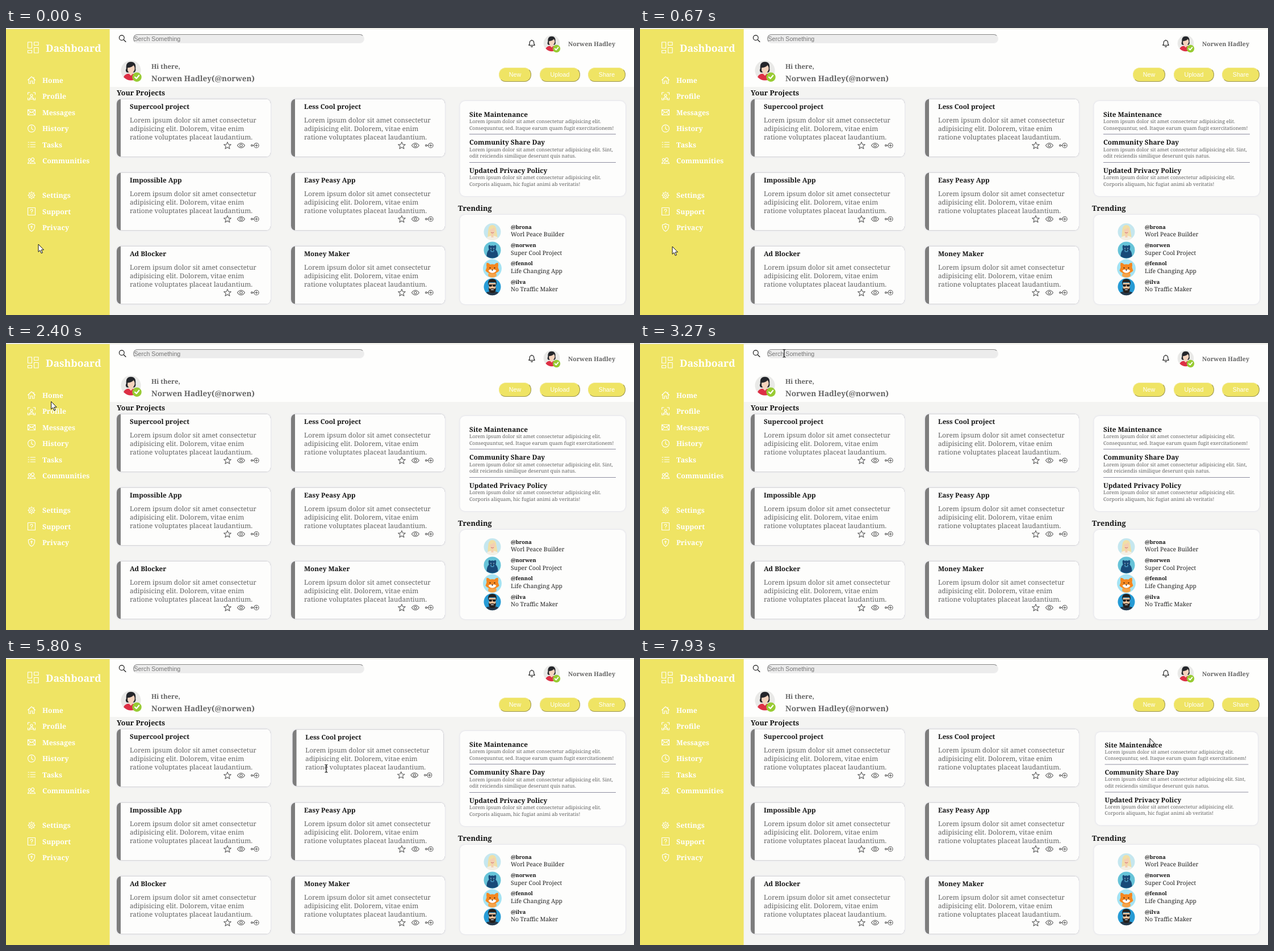
Write an HTML page that moves like this. It is 1106 px wide and 507 px high and loops after 8000 ms.

```html
<!DOCTYPE html>
<html lang="en">
<head>
<meta charset="utf-8">
<title>Dashboard</title>
<style>
html, body { margin: 0; width: 100%; height: 100%; overflow: hidden; background: #f4f4f2; }
#stage { position: relative; width: 1106px; height: 507px; overflow: hidden; }
svg { position: absolute; left: 0; top: 0; }
text { white-space: pre; text-rendering: geometricPrecision; }
.box { filter: drop-shadow(0 0 1.5px #d6d6e6); }
.line { fill: none; stroke-width: 1.1; stroke-linecap: round; stroke-linejoin: round; }
.search, .btn { position: absolute; box-sizing: border-box; font: 10.67px "Liberation Sans", Arial, sans-serif; }
.search { left: 223.5px; top: 11px; width: 407px; height: 16px; line-height: 14px; padding-left: 1px; color: #757575;
  background: #ececec; border: 1.6px solid; border-color: #858585 #eee #eee #858585; border-radius: 8px; }
.btn { top: 70px; height: 25px; line-height: 22px; text-align: center; color: #fff; background: #efe464;
  border: 1.6px solid; border-color: #f1e88c #9a944c #9a944c #f1e88c; border-radius: 12px; }
#status { position: absolute; left: -1px; top: 493px; width: 123px; height: 15px; box-sizing: border-box; padding-left: 2px;
  font: 9.1px/15px "Open Sans", "Noto Sans", sans-serif; color: #555; background: #e6e6e4; border: 1px solid #c4c4c4; border-top-right-radius: 3px; }
</style>
</head>
<body>
<div id="stage">
  <svg id="page" width="1106" height="507"></svg>
  <div class="search">Serch Something</div>
  <div class="btn" style="left:868px;width:57px">New</div>
  <div class="btn" style="left:940px;width:71px">Upload</div>
  <div class="btn" style="left:1025px;width:66px">Share</div>
  <div id="status">127.0.0.1:5500/index.html#</div>
  <svg width="1106" height="507">
    <g id="pointer" stroke="#111" stroke-linejoin="round" fill="#fff">
      <path id="arrow" d="M0 0V13.5L3 10.7L5.2 16L7.4 15L5.2 9.9H9.5Z"/>
      <path id="hand" d="M-2 1.5Q-2 0-.5 0T1 1.5V7.5Q3 6.5 4 8Q6 7.3 6.6 9Q9 8.7 9 11V15Q9 18 7 20.5H0Q-1 17-5 12Q-5 9.5-2 12Z"/>
      <path id="beam" fill="none" stroke-width="1.2" d="M-2.5-6.5Q0-6.5 0-5Q0-6.5 2.5-6.5M0-5V6M-2.5 7Q0 7 0 5.5Q0 7 2.5 7"/>
    </g>
  </svg>
</div>
<script>
const $ = id => document.getElementById(id);
const FAMILY = '"Noto Serif", "DejaVu Serif", serif';
const GREY = '#636363', INK = '#141414';

// Font scale per weight, so nominal sizes keep the layout's line lengths
const pen = document.createElement('canvas').getContext('2d');
function fontScale(weight, sample, width, size) {
  pen.font = `${weight} 100px ${FAMILY}`;
  return width / pen.measureText(sample).width * 100 / size;
}
const scale = {
  400: fontScale(400, 'Lorem ipsum dolor sit amet consectetur', 223, 14),
  700: fontScale(700, 'Supercool project', 105, 13.9)
};

const text = (x, y, str, size, fill = INK, weight = 700, attrs = '') =>
  `<text x="${x}" y="${y}" font-family='${FAMILY}' font-weight="${weight}" font-size="${(size * scale[weight]).toFixed(2)}" fill="${fill}" ${attrs}>${str}</text>`;
const rect = (x, y, w, h, fill, more = '') =>
  `<rect x="${x}" y="${y}" width="${w}" height="${h}" fill="${fill}" ${more}/>`;
const circle = (x, y, r, fill, more = '') =>
  `<circle cx="${x}" cy="${y}" r="${r}" fill="${fill}" ${more}/>`;
const path = (d, fill, more = '') => `<path d="${d}" fill="${fill}" ${more}/>`;
const stroke = (d, color = '#fff', more = '') => `<path class="line" d="${d}" stroke="${color}" ${more}/>`;
const at = (x, y, inner, s = 1) => `<g transform="translate(${x} ${y}) scale(${s})">${inner}</g>`;
const ring = (x, y, r) => `M${x - r} ${y}a${r} ${r} 0 1 0 ${2 * r} 0a${r} ${r} 0 1 0 ${-2 * r} 0`;

// Sidebar
const gear = Array.from({ length: 8 }, (_, i) => {
  const c = Math.cos(i * Math.PI / 4), s = Math.sin(i * Math.PI / 4);
  return `M${4.8 * c} ${4.8 * s}L${6.4 * c} ${6.4 * s}`;
}).join('');
const nav = [
  ['Home', 92, 38, 'M-6.5 0L0-6L6.5 0M-4.8-1V6H-1.6V1.5H1.6V6H4.8V-1M4-5V-3'],
  ['Profile', 120.5, 43, 'M-6.5-3V-6.5H-3M3-6.5H6.5V-3M6.5 3V6.5H3M-3 6.5H-6.5V3M-4 5Q-3 2 0 2T4 5Z' + ring(0, -1.5, 2)],
  ['Messages', 149, 60, 'M-6.5-4.8H6.5V4.8H-6.5ZM-6.5-4L0 .5L6.5-4M-6 4.5L-1.8-.8M6 4.5L1.8-.8'],
  ['History', 177.5, 48, ring(0, 0, 6.4) + 'M0-4V.5L3 2.2'],
  ['Tasks', 206, 37, 'M-2-4H6.5M-2 0H6.5M-2 4H6.5M-6-4H-4.5M-6 0H-4.5M-6 4H-4.5'],
  ['Communities', 234.5, 83, ring(2, -2.5, 2.6) + 'M-2.5 5Q-2 1.5 2 1.5T6.5 5Z' + ring(-3.7, -2, 2) + 'M-4 5H-6.5Q-6 2-3.5 1.6'],
  ['Settings', 295.5, 50, ring(0, 0, 4.8) + ring(0, 0, 2) + gear],
  ['Support', 324, 52, 'M-6.5-6.5H6.5V6.5H-6.5ZM-2-1.8Q-2-3.8 0-3.8T2-1.8Q2-.6 0 .8V1.4M0 3.6V3.8'],
  ['Privacy', 352.5, 46, 'M0-6.8Q3-5 5.7-4.8Q6 4 0 6.8Q-6 4-5.7-4.8Q-3-5 0-6.8M0-.5V2.2' + ring(0, -1.6, 1.1)]
];

// Avatars, drawn around 0,0
const user = circle(0, 0, 15, '#e9e9e7') +
  path('M-7-3Q-8-13 0-13T7-3Q8 1 5 3H-6Q-9 1-7-3', '#24262b') +
  path('M-5-4Q2-5 4-8Q7-4 5 0Q3 4.5 0 4.5T-5 0ZM-2.5 2H2.5V8H-2.5Z', '#f5d3bd') +
  path('M-11 10Q-9 5-3 5L0 8L3 5Q9 5 11 10Q6 15 0 15T-11 10', '#dd2f45') +
  circle(9, 10, 7, '#98cb33') + stroke('M6 10L8.3 12.2L12.2 7.5', '#fff', 'style="stroke-width:1.9"');
const blonde = circle(0, 0, 15, '#c5e7ef') +
  path('M-8 9Q-8 2-7-4Q-6-12 0-12T7-4Q8 2 9 9Z', '#f0dfa6') +
  path('M-10 11Q-7 7 0 7T10 11Q6 15 0 15T-10 11', '#f3efe4') +
  path('M-4.5-4Q1-5 3-8Q6-3 4 2Q2 4.5 0 4.5T-4-1ZM-2 3H2V10H-2Z', '#f4cfb2') +
  stroke('M-2 1.4Q0 2.6 2 1.4', '#c96a64');
const bear = circle(0, 0, 15, '#66c3d8') +
  path('M-10 11Q-10 3-6-1Q-8-9-5-9Q-3.5-9-3-7.5Q0-9 3-7.5Q3.5-9 5-9Q8-9 6-1Q10 3 10 11Q5 14 0 14T-10 11', '#194a78') +
  `<ellipse cy="1" rx="3.4" ry="2.6" fill="#3f86b0"/>` + circle(0, 0, 1.3, '#10243c') +
  circle(-2.5, -3.2, .7, '#fff') + circle(2.5, -3.2, .7, '#fff');
const fox = circle(0, 0, 16.4, '#a4e3f3') +
  path('M-6 7H6Q8 11 7 14Q0 18-7 14Q-8 11-6 7', '#f5a44a') +
  path('M-10-10Q-6-10-4-7Q0-8 4-7Q6-10 10-10Q11-5 10-2L12 4Q8 9 0 9T-12 4L-10-2Q-11-5-10-10', '#f5871f') +
  path('M-7 4Q-4 1 0 2Q4 1 7 4Q4 8 0 8T-7 4', '#fff') +
  circle(-4, -1, 1.1, '#35231b') + circle(4, -1, 1.1, '#35231b') + path('M-1.8 2H1.8L0 4.2Z', '#35231b');
const beard = circle(0, 0, 15, '#269bd5') +
  path('M-11 10Q-8 8 0 8T11 10Q7 15 0 15T-11 10', '#25384a') +
  path('M-6-7H6V4Q5 8 0 8T-6 4Z', '#ecbf98') +
  path('M-7-3Q-9-14 0-14Q9-14 7-3L5.5-8H-5.5ZM-6.5 1Q-5 4-3 3.4Q0 2 3 3.4Q5 4 6.5 1Q7 11 0 11T-6.5 1', '#25211f') +
  rect(-5.8, -4, 5, 3.6, '#17191b', 'rx="1.4"') + rect(.8, -4, 5, 3.6, '#17191b', 'rx="1.4"') +
  stroke('M-6-3.4H6', '#17191b') + stroke('M-1.8 5.2H1.8');

// Cards and panels
const cards = [
  ['Supercool project', 195, 125], ['Less Cool project', 502, 125],
  ['Impossible App', 195, 255], ['Easy Peasy App', 502, 255],
  ['Ad Blocker', 195, 385], ['Money Maker', 502, 385]
].map(([title, x, y]) => ({ title, x, y, w: 271, h: 103 }));
const notice = { x: 799.5, y: 129, w: 291.5, h: 168 };
const trend = { x: 799.5, y: 330, w: 291.5, h: 158 };

const lorem = ['Lorem ipsum dolor sit amet consectetur', 'adipisicing elit. Dolorem, vitae enim', 'ratione voluptates placeat laudantium.'];
const star = 'M0-6L1.8-1.9L6.3-1.6L2.8 1.3L4 5.7L0 3.3L-4 5.7L-2.8 1.3L-6.3-1.6L-1.8-1.9Z';
const eye = 'M-6.5 0Q-3.5-4.3 0-4.3T6.5 0Q3.5 4.3 0 4.3T-6.5 0' + ring(0, 0, 2.2);
const node = ring(3, 0, 4.2) + 'M.8 0H5.2M3-2.2V2.2M-3.5 0H-1.2' + ring(-5, 0, 1.4);

function cardArt(c) {
  return at(c.x, c.y,
    rect(0, .5, 271, 102, '#7d7d7d', 'rx="8" class="box"') +
    path('M7 .5H263a8 8 0 0 1 8 8V94.5a8 8 0 0 1-8 8H7Z', '#fdfdfc') +
    text(23, 18, c.title, 13.9) +
    lorem.map((s, i) => text(23, 41.5 + 15.4 * i, s, 14, GREY, 400)).join('') +
    [star, eye, node].map((d, i) => at(195 + 24 * i, 82.5, stroke(d, '#5d5d5d'))).join(''));
}

const notes = [
  ['Site Maintenance', 'Lorem ipsum dolor sit amet consectetur adipisicing elit.', 'Consequuntur, sed. Itaque earum quam fugit exercitationem!'],
  ['Community Share Day', 'Lorem ipsum dolor sit amet consectetur adipisicing elit. Sint,', 'odit reiciendis similique deserunt quis natus.'],
  ['Updated Privacy Policy', 'Lorem ipsum dolor sit amet consectetur adipisicing elit.', 'Corporis aliquam, hic fugiat animi ab veritatis!']
];
const people = [
  ['@brona', 'Worl Peace Builder', blonde], ['@norwen', 'Super Cool Project', bear],
  ['@fennol', 'Life Changing App', fox], ['@ilva', 'No Traffic Maker', beard]
];
const panel = p => rect(p.x, p.y, p.w, p.h, '#fdfdfc', 'rx="9" class="box"');

const noticeArt = panel(notice) + notes.map(([title, a, b], i) => {
  const y = 156.5 + 49.5 * i;
  return text(816, y, title, 14) + text(816, y + 11.5, a, 10.45, GREY, 400) + text(816, y + 23, b, 10.45, GREY, 400) +
    (i < 2 ? rect(816, Math.floor(y + 31), 258, 1, '#8d8da0') : '');
}).join('');

const trendArt = panel(trend) + people.map(([name, work, face], i) => {
  const y = 360 + 32.4 * i;
  return at(856.5, y, face) + text(889, y - 5.5, name, 11) + text(889, y + 8.2, work, 12.35, '#222', 400);
}).join('');

$('page').innerHTML =
  rect(0, 0, 1106, 507, '#f4f4f2') + rect(183, 2, 923, 102, '#fefefd') +
  rect(0, 0, 1106, 1, '#fdfdfb') + rect(0, 1, 1106, 1, '#dfded2') + rect(0, 2, 182.6, 505, '#efe464') +
  stroke('M38.5 25H45.5V35.5H38.5ZM49.5 25H57V30.5H49.5ZM49.5 34.5H57V44H49.5ZM38.5 39.5H45.5V44H38.5Z') +
  text(70, 41.5, 'Dashboard', 20.9, '#fff') +
  nav.map(([name, y, , d], i) => at(45, y, stroke(d)) + text(64, y + 4.7, name, 14.65, '#fff', 700, `id="nav${i}"`)).join('') +
  stroke(ring(203.8, 17.3, 4.4) + 'M207 20.5L211 24.5', '#111', 'id="lens"') +
  stroke('M920.8 30.5Q922.3 29 922.3 26Q922.3 22 926 22T929.7 26Q929.7 29 931.2 30.5ZM924.5 32.5Q926 34 927.5 32.5M926 21.8V21', '#111') +
  at(961, 27, user, .95) + text(990, 32, 'Norwen Hadley', 12.6, GREY) +
  at(220, 75, user, 1.17) + text(256, 72, 'Hi there,', 13.6, GREY) + text(256, 94, 'Norwen Hadley(@norwen)', 16.1, GREY) +
  text(195, 118.5, 'Your Projects', 14.9) + text(796, 322.5, 'Trending', 15.3) +
  cards.map((c, i) => `<g id="card${i}">${cardArt(c)}</g>`).join('') +
  `<g id="notice">${noticeArt}</g>` + trendArt;

// Pointer route: time, x, y
const route = [
  [0, 57, 382], [500, 57, 386], [900, 57, 386], [1150, 64, 353], [1420, 68, 324], [1620, 70, 293], [1720, 70, 293],
  [1950, 76, 235], [2200, 78, 150], [2450, 80, 92], [2700, 120, 45], [3100, 246, 20], [3270, 254, 18], [3650, 254, 18],
  [4050, 224, 20], [4300, 223, 21], [4800, 300, 160], [5200, 400, 185], [5450, 520, 194], [5700, 564, 195], [6000, 564, 195],
  [6600, 700, 200], [7200, 830, 168], [7800, 898, 142], [8000, 898, 142]
];
const LOOP = 8000, FADE = 200, SAMPLES = 10;

function position(t) {
  const i = Math.max(1, route.findIndex(r => r[0] >= t));
  const [t0, x0, y0] = route[i - 1], [t1, x1, y1] = route[i];
  const k = (t - t0) / (t1 - t0);
  return [x0 + (x1 - x0) * k, y0 + (y1 - y0) * k];
}
const inside = ([x, y], b) => x >= b.x && x <= b.x + b.w && y >= b.y && y <= b.y + b.h;

// Share of the last FADE ms spent over a box
function hover(t, box) {
  let n = 0;
  for (let i = 0; i < SAMPLES; i++) n += inside(position(Math.max(0, t - i * FADE / SAMPLES)), box);
  return n / SAMPLES;
}
function shrink(id, b, t) {
  const s = 1 - .02 * hover(t, b), cx = b.x + b.w / 2, cy = b.y + b.h / 2;
  $(id).setAttribute('transform', `translate(${cx * (1 - s)} ${cy * (1 - s)}) scale(${s})`);
}

const links = nav.map(([, y, w]) => ({ x: 64, y: y - 9, w, h: 18 }));
const lens = { x: 196, y: 9, w: 29, h: 18 };
const field = { x: 225, y: 11, w: 406, h: 16 };
const copy = cards.flatMap(c => [
  { x: c.x + 23, y: c.y + 8, w: 105, h: 14 }, { x: c.x + 23, y: c.y + 29, w: 223, h: 46 }
]);

function draw(t) {
  const p = position(t), over = b => inside(p, b);
  const onLink = links.some(over), onLens = over(lens);
  const kind = onLink || onLens ? 'hand' : over(field) || copy.some(over) ? 'beam' : 'arrow';
  for (const id of ['arrow', 'hand', 'beam']) $(id).style.display = id === kind ? '' : 'none';
  $('pointer').setAttribute('transform', `translate(${p[0]} ${p[1]})`);
  links.forEach((b, i) => $('nav' + i).setAttribute('fill', over(b) ? '#d2691e' : '#fff'));
  $('lens').setAttribute('stroke', onLens ? '#555' : '#111');
  $('status').style.display = onLink ? '' : 'none';
  cards.forEach((c, i) => shrink('card' + i, c, t));
  shrink('notice', notice, t);
}

const start = performance.now();
function tick() {
  draw((performance.now() - start) % LOOP);
  requestAnimationFrame(tick);
}
tick();
</script>
</body>
</html>
```
